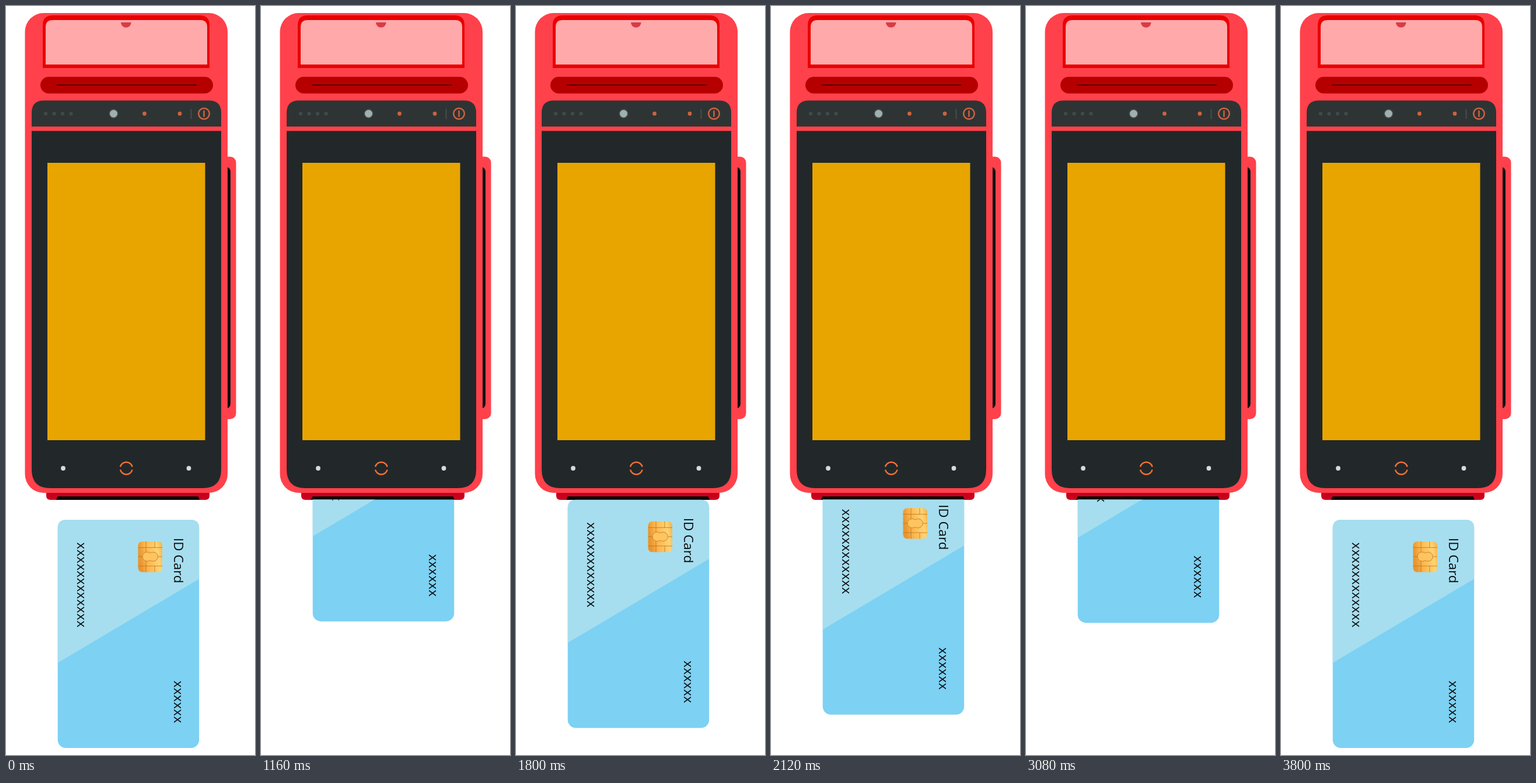
Animation of 427x1280 px, one loop 3.84 s. Source, as an HTML page:

```html
<!DOCTYPE html>
<html lang="en">
<head>
<meta charset="utf-8">
<title>Card terminal</title>
<style>
  html, body { margin: 0; width: 100%; height: 100%; overflow: hidden; background: #fff; }
  svg { display: block; width: 427px; height: 1280px; }
  text { font: 22.4px "Open Sans", sans-serif; fill: #0b0b0b; }
  .xs { letter-spacing: .42px; }
</style>
</head>
<body>
<svg viewBox="0 0 427 1280">
  <defs>
    <clipPath id="below"><rect y="843.5" width="427" height="436.5"/></clipPath>
    <linearGradient id="gold" x1="0" y1=".2" x2="1" y2="0">
      <stop offset="0" stop-color="#e8952f"/>
      <stop offset=".28" stop-color="#fdb54c"/>
      <stop offset=".75" stop-color="#ffd375"/>
      <stop offset="1" stop-color="#f2b144"/>
    </linearGradient>
  </defs>

  <!-- side handle -->
  <rect x="366" y="257.5" width="28.5" height="448.5" rx="10" fill="#ff414b"/>
  <rect x="366" y="275" width="19" height="413" rx="8" fill="#0b0f11"/>

  <!-- card mouth -->
  <path d="M69 828H349V837Q349 844 342 844H76Q69 844 69 837Z" fill="#c8001e"/>
  <path d="M88.500 838H329.500L332 844H86Z" fill="#060304"/>

  <!-- shell and paper bay -->
  <rect x="32.500" y="12" width="347.500" height="820" rx="32" fill="#ff414b"/>
  <path d="M63 106V33Q63 16 80 16H332Q349 16 349 33V106Z" fill="#ea0000"/>
  <path d="M68 100V36Q68 24 80 24H333Q345 24 345 36V100Z" fill="#ffa9ab"/>
  <path d="M197 28H214.600A8.800 8.800 0 0 1 197 28Z" fill="#d93b45"/>
  <rect x="59" y="121" width="296" height="28.500" rx="14.250" fill="#b60000"/>
  <path d="M87 135H327" stroke="#3c0303" stroke-width="1.600"/>

  <!-- status strip -->
  <path d="M44 206V182.500Q44 161.500 65 161.500H348Q369 161.500 369 182.500V206Z" fill="#2e3434"/>
  <g fill="#404848">
    <circle cx="68" cy="184" r="3.200"/>
    <circle cx="82.500" cy="184" r="3.200"/>
    <circle cx="97" cy="184" r="3.200"/>
    <circle cx="111.500" cy="184" r="3.200"/>
    <circle cx="184.500" cy="184" r="8.200"/>
    <rect x="316.200" y="176" width="2.600" height="17"/>
  </g>
  <circle cx="184.500" cy="184" r="6.500" fill="#9fb0b0"/>
  <g fill="#cd6240">
    <circle cx="237.500" cy="184" r="3.400"/>
    <circle cx="298" cy="184" r="3.400"/>
  </g>
  <g fill="none" stroke="#cd6240" stroke-width="2.500">
    <circle cx="339.500" cy="184" r="9.300"/>
    <path d="M339.500 178.500V189.500"/>
  </g>

  <!-- front panel -->
  <path d="M44 213.500H369V792Q369 824 337 824H76Q44 824 44 792Z" fill="#22282a"/>
  <rect x="71" y="268" width="270.500" height="474" fill="#e8a500"/>
  <g fill="#d8dada">
    <circle cx="98" cy="790" r="3.900"/>
    <circle cx="313.500" cy="790" r="3.900"/>
  </g>
  <path d="M196 787.500A10.600 10.600 0 0 1 216.600 787.500M196 792.500A10.600 10.600 0 0 0 216.600 792.500"
        fill="none" stroke="#f47033" stroke-width="2.500"/>

  <g clip-path="url(#below)">
    <g id="card">
      <rect x="88.700" y="878" width="242.500" height="390" rx="14" fill="#7dd1f3"/>
      <path d="M88.700 1122.500V892Q88.700 878 102.700 878H317.200Q331.200 878 331.200 892V979Z" fill="#a6deef"/>
      <rect x="226.500" y="915" width="41.500" height="52.500" rx="7" fill="url(#gold)"/>
      <g fill="none" stroke="#b9741f" stroke-width=".8">
        <path d="M226.500 925.500H268M226.500 957H268M226.500 941H234M260.500 941H268M240 915V933M240 949V967.500M255 915V925.500M255 957V967.500"/>
        <path d="M240 933.500C243 932.500 245 933.500 247 935C253 931 260.500 935 260.500 941S253 951 247 947.500C241 951 234 947 234 941C234 937.500 236.500 934.500 240 933.500Z" fill="#ffc45f"/>
      </g>
      <text transform="translate(288 909) rotate(90)">ID Card</text>
      <text class="xs" transform="translate(122 916.500) rotate(90)">xxxxxxxxxxxx</text>
      <text class="xs" transform="translate(287.700 1153) rotate(90)">xxxxxx</text>
    </g>
  </g>
</svg>
<script>
  const STEP = 40, STEPS = 96, DEPTH = 273.2;
  const card = document.getElementById("card");

  // Two insertions; the second withdrawal ends one step early.
  function inserted(n) {
    const k = n % 48, out = n < 48 ? 24 : 23;
    return k < 24 ? k / 24 : Math.max(0, 1 - (k - 24) / out);
  }

  function draw(ms) {
    const n = Math.floor((ms + 1) / STEP) % STEPS;
    card.setAttribute("transform", `translate(0 ${(-DEPTH * inserted(n)).toFixed(2)})`);
  }

  let start;
  function tick(now) {
    start ??= now;
    draw(now - start);
    requestAnimationFrame(tick);
  }
  draw(0);
  requestAnimationFrame(tick);
</script>
</body>
</html>
```
